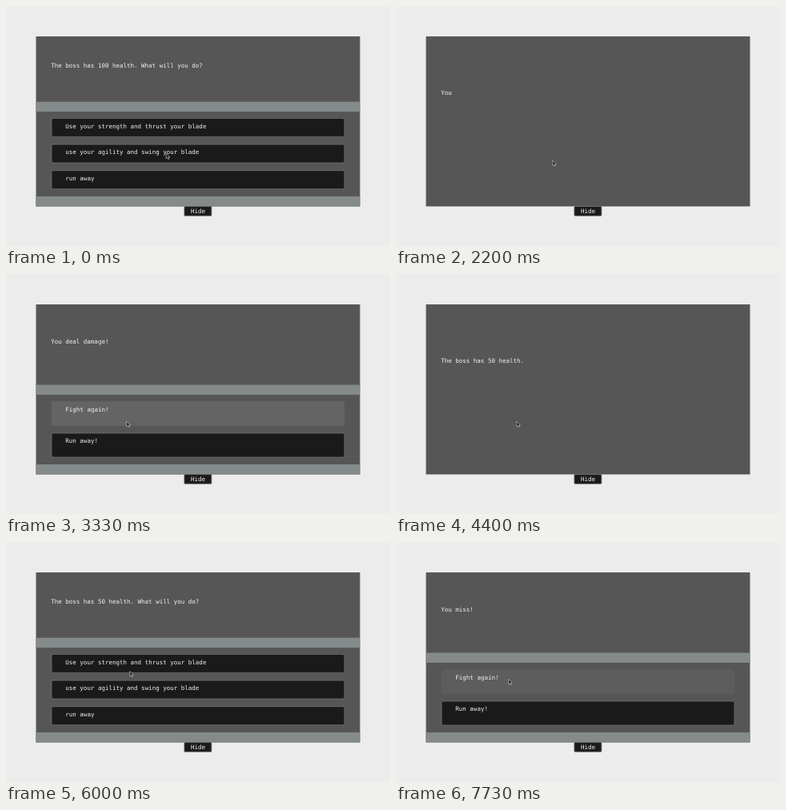
An HTML page for the animation above (7790 ms loop, 480 by 300 pixels).

```html
<!DOCTYPE html>
<html lang="en">
<head>
<meta charset="utf-8">
<title>Boss fight</title>
<style>
  html, body { margin: 0; width: 100%; height: 100%; overflow: hidden; background: #ececec; }
  svg { display: block; width: 480px; height: 300px; }
  text {
    font: 7.5px "DejaVu Sans Mono", monospace;
    fill: #f2f2f2;
    white-space: pre;
    text-rendering: geometricPrecision;
  }
  .bar { fill: #858a8a; }
  .button { fill: #1a1a1a; stroke: #707070; stroke-width: .8; }
  .button.hover { fill: #5d5d5d; stroke: #5d5d5d; }
  .button.press { fill: #646464; stroke: #646464; }
</style>
</head>
<body>
<svg id="stage" viewBox="0 0 480 300"></svg>
<script>
const LOOP = 7790;
const TICKS_PER_SECOND = 15;
const stage = document.getElementById('stage');

function add(parent, tag, attrs, content = '') {
  const node = document.createElementNS(stage.namespaceURI, tag);
  for (const [key, value] of Object.entries(attrs)) node.setAttribute(key, value);
  node.textContent = content;
  parent.append(node);
  return node;
}

function box(parent, x, y, width, height, attrs) {
  return add(parent, 'rect', { x, y, width, height, ...attrs });
}

box(stage, 37.5, 38, 405, 212.5, { fill: '#565656' });

function makeMenu(barY, firstY, pitch, height, textDrop, labels) {
  const group = add(stage, 'g', {});
  for (const y of [barY, 238]) box(group, 37.5, y, 405, 12.4, { class: 'bar' });
  const buttons = labels.map((label, i) => {
    const y = firstY + i * pitch;
    const button = box(group, 57, y, 366, height, { class: 'button', rx: 2 });
    add(group, 'text', { x: 74.3, y: y + textDrop }, label);
    return button;
  });
  return { group, buttons };
}

const menus = {
  attack: makeMenu(119.7, 140.4, 32.65, 23, 12.3, [
    'Use your strength and thrust your blade',
    'use your agility and swing your blade',
    'run away'
  ]),
  again: makeMenu(138.5, 159.4, 39.6, 30, 12.1, ['Fight again!', 'Run away!'])
};

const message = add(stage, 'text', { x: 56.2 });
box(stage, 222.9, 250.6, 34, 11.7, { class: 'button', rx: 1 });
add(stage, 'text', { x: 231, y: 259.1 }, 'Hide');
const pointer = add(stage, 'path', {
  d: 'M0 0V6.3L1.5 5L2.5 7.2L3.6 6.7L2.6 4.6H4.5Z',
  fill: '#111', stroke: '#ddd', 'stroke-width': .6, 'stroke-linejoin': 'round'
});

const FIRST = 'The boss has 100 health. What will you do?';
const SECOND = 'The boss has 50 health. What will you do?';
const HIT = 'You deal damage!';
const MISS = 'You miss!';

// Each scene: start tick, message, baseline, menu, typing as [tick, characters].
const scenes = [
  { at: 0, text: FIRST, y: 76.5, menu: 'attack' },
  { at: 26, text: HIT, y: 110.5, typing: [[32, 0], [38, 16]] },
  { at: 40, text: HIT, y: 86.6, menu: 'again' },
  { at: 52, text: SECOND, y: 110.5, typing: [[59, 0], [66, 23], [67, 23], [68, 28], [69, 28], [73, 41]] },
  { at: 76, text: SECOND, y: 76.5, menu: 'attack' },
  { at: 97, text: MISS, y: 110.5, typing: [[102, 0], [105, 9]] },
  { at: 107, text: MISS, y: 86.6, menu: 'again' }
];

// Button states: from tick, up to tick, button index, class.
const states = [
  [7, 24, 1, 'hover'], [24, 26, 1, 'press'],
  [42, 50, 0, 'hover'], [50, 52, 0, 'press'],
  [86, 88, 1, 'hover'],
  [91, 94, 0, 'hover'], [94, 95, 0, 'press'], [95, 97, 0, 'hover'],
  [115, 117, 0, 'hover']
];

// Pointer path: tick, x, y.
const path = [
  [6, 200.2, 184.4], [10, 196.2, 193.2], [40, 195.8, 193.2], [44, 150.8, 184.4],
  [85, 150.8, 184.4], [90, 154.8, 161.5], [91, 154.6, 150.3],
  [112, 154.6, 150.3], [116, 140.8, 171.5]
];

function along(points, tick) {
  const next = points.findIndex(p => p[0] > tick);
  if (next === 0) return points[0].slice(1);
  if (next < 0) return points.at(-1).slice(1);
  const a = points[next - 1], b = points[next];
  const part = (tick - a[0]) / (b[0] - a[0]);
  return a.slice(1).map((v, i) => v + (b[i + 1] - v) * part);
}

function draw(time) {
  const tick = Math.floor((time % LOOP + 5) * TICKS_PER_SECOND / 1000);
  const scene = scenes.findLast(s => s.at <= tick);
  const length = scene.typing ? Math.round(along(scene.typing, tick)[0]) : scene.text.length;
  message.textContent = scene.text.slice(0, length);
  message.setAttribute('y', scene.y);

  const state = states.find(([from, to]) => tick >= from && tick < to);
  for (const [name, { group, buttons }] of Object.entries(menus)) {
    group.setAttribute('display', name === scene.menu ? 'inline' : 'none');
    buttons.forEach((button, i) => {
      const look = state && state[2] === i ? ' ' + state[3] : '';
      button.setAttribute('class', 'button' + look);
    });
  }
  pointer.setAttribute('transform', `translate(${along(path, tick)})`);
}

let start;
function frame(now) {
  start ??= now;
  draw(now - start);
  requestAnimationFrame(frame);
}
draw(0);
requestAnimationFrame(frame);
</script>
</body>
</html>
```
